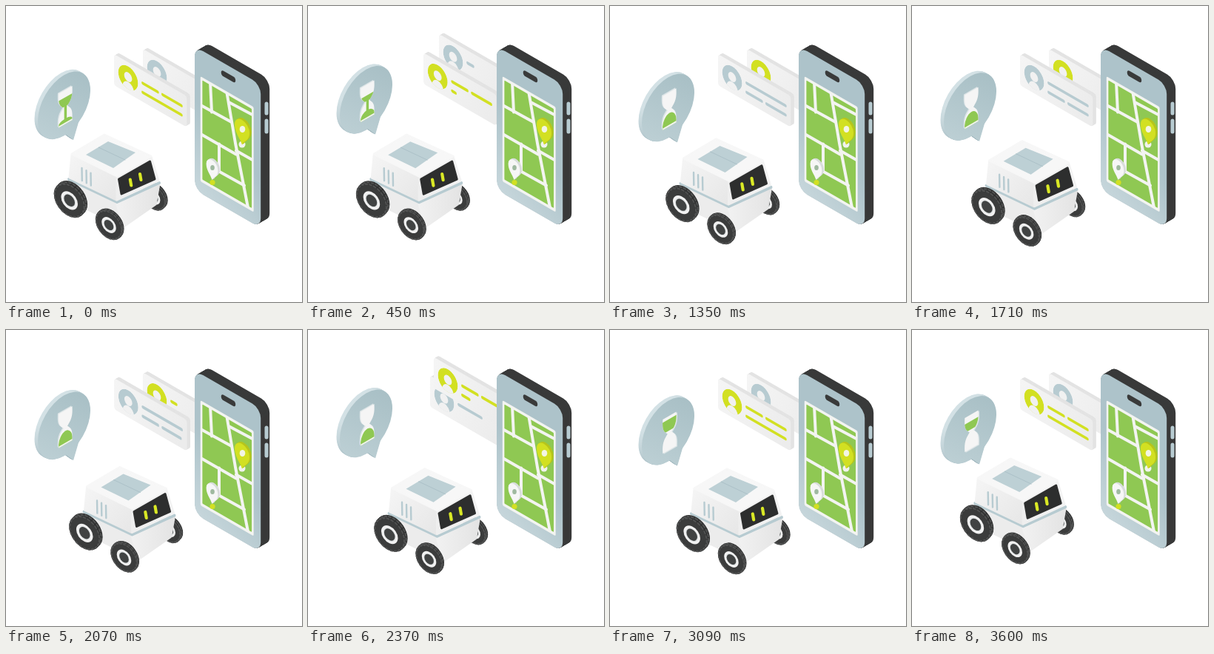
An HTML page with a canvas that plays this animation: 400x400 px, repeating every 3.63 s.

```html
<!DOCTYPE html>
<html lang="en">
<head>
<meta charset="utf-8">
<title>Delivery robot</title>
<style>
  html, body { margin: 0; width: 100%; height: 100%; overflow: hidden; background: #fff; }
  canvas { display: block; width: 400px; height: 400px; }
</style>
</head>
<body>
<canvas id="stage"></canvas>
<script>
const LOOP = 3630, HALF = LOOP / 2;
const LIME = '#d2e022', GREEN = '#8fc853', STEEL = '#b7cbd1', WHITE = '#f5f5f5', DARK = '#393a3a';

const canvas = document.getElementById('stage');
const dpr = window.devicePixelRatio || 1;
canvas.width = canvas.height = 400 * dpr;
const c = canvas.getContext('2d');

// Isometric planes: LEFT faces lower left, RIGHT faces lower right.
const LEFT = [.866, .5, 0, 1], RIGHT = [.866, -.5, 0, 1], FLAT = [1, 0, 0, 1];
const WHEEL = [.95, .4, 0, .98];

const clamp = x => Math.min(1, Math.max(0, x));
const span = (t, a, b) => clamp((t - a) / (b - a));
const ease = x => x * x * (3 - 2 * x);

// Smooth curve through [time, value] keys, at rest at both ends.
function track(keys, t) {
  const last = keys.length - 1;
  if (t <= keys[0][0]) return keys[0][1];
  if (t >= keys[last][0]) return keys[last][1];
  const i = keys.findIndex(k => k[0] > t) - 1;
  const slope = j => j <= 0 || j >= last ? 0 :
    (keys[j + 1][1] - keys[j - 1][1]) / (keys[j + 1][0] - keys[j - 1][0]);
  const [t0, a] = keys[i], [t1, b] = keys[i + 1], d = t1 - t0, s = (t - t0) / d;
  const s2 = s * s, s3 = s2 * s;
  return a * (2 * s3 - 3 * s2 + 1) + b * (3 * s2 - 2 * s3)
    + d * (slope(i) * (s3 - 2 * s2 + s) + slope(i + 1) * (s3 - s2));
}

function on(plane, x, y, draw) {
  c.save();
  c.transform(...plane, x, y);
  draw();
  c.restore();
}

function fade(x0, y0, x1, y1, from, to) {
  const g = c.createLinearGradient(x0, y0, x1, y1);
  g.addColorStop(0, from);
  g.addColorStop(1, to);
  return g;
}

function poly(color, ...p) {
  c.beginPath();
  for (let i = 0; i < p.length; i += 2) c.lineTo(p[i], p[i + 1]);
  c.closePath();
  c.fillStyle = color;
  c.fill();
}

// Polygon with softly rounded corners.
function soft(color, ...p) {
  poly(color, ...p);
  c.strokeStyle = color;
  c.lineWidth = 3;
  c.lineJoin = 'round';
  c.stroke();
}

function line(color, width, ...p) {
  c.beginPath();
  for (let i = 0; i < p.length; i += 2) c.lineTo(p[i], p[i + 1]);
  c.strokeStyle = color;
  c.lineWidth = width;
  c.lineCap = c.lineJoin = 'round';
  c.stroke();
}

function disc(color, x, y, rx, ry = rx) {
  c.beginPath();
  c.ellipse(x, y, rx, ry, 0, 0, 7);
  c.fillStyle = color;
  c.fill();
}

function box(color, x, y, w, h, r) {
  c.beginPath();
  c.roundRect(x, y, w, h, r);
  c.fillStyle = color;
  c.fill();
}

// Stack copies of a shape from the back (dx, dy) to the front.
function extrude(plane, x, y, dx, dy, side, shape) {
  const n = Math.ceil(Math.abs(dx) * 2);
  for (let i = n; i > 0; i--) on(plane, x + dx * i / n, y + dy * i / n, () => shape(side));
}

function bubble(t) {
  const y = 132.2 - 5.8 * Math.cos(2 * Math.PI * (t / HALF - .31)), x = 78.5;
  const shape = color => {
    poly(color, 2, 40, 14.5, 54, 23, 33);
    disc(color, 0, 0, 41);
  };
  extrude(RIGHT, x, y, -4.5, -2.6, fade(-30, -20, 0, 50, '#d3e1e5', '#94adb5'), shape);
  on(RIGHT, x, y, () => {
    shape(fade(25, -30, -30, 30, '#a9c0c6', '#bccfd4'));
    c.translate(2.2, 3);
    hourglass(t);
  });
}

function hourglass(t) {
  const turned = t >= 2700;
  const fall = span(turned ? t : t + LOOP, 3050, 4800);
  c.rotate(Math.PI * ease(span(t, 2700, 3050)));
  const glass = () => {
    c.beginPath();
    c.moveTo(-10.5, -23);
    c.lineTo(10.5, -23);
    c.bezierCurveTo(11.5, -9, 9, -6, 3, 0);
    c.bezierCurveTo(9, 6, 11.5, 9, 10.5, 23);
    c.lineTo(-10.5, 23);
    c.bezierCurveTo(-11.5, 9, -9, 6, -3, 0);
    c.bezierCurveTo(-9, -6, -11.5, -9, -10.5, -23);
    c.closePath();
  };
  c.save();
  c.translate(-1.6, -1.6);
  glass();
  c.fillStyle = '#dde5e7';
  c.fill();
  c.restore();
  glass();
  c.fillStyle = WHITE;
  c.fill();
  c.save();
  c.clip();
  c.fillStyle = GREEN;
  if (turned) {
    // The full chamber is carried over to the top by the turn.
    c.fillRect(-12, 3, 24, 16 - 15 * fall);
  } else {
    const top = -19 + 18 * fall;
    c.fillRect(-12, top, 24, -1 - top);
    if (fall < 1) c.fillRect(-2, -2, 4, 20);
    if (fall > 0) disc(GREEN, 0, 21, 11, 16 * fall);
    c.fillStyle = WHITE;
    c.fillRect(-12, 21, 24, 4);
  }
  c.restore();
}

const LONG = [[45, 105]], SPLIT = [[45, 68], [76, 105]];

function card(x, y, color, rows, p) {
  const shape = fill => box(fill, 0, 0, 113.5, 42, 4);
  extrude(LEFT, x, y, 4.5, -2.6, '#e3e3e3', shape);
  on(LEFT, x, y, () => {
    shape(fade(0, 0, 100, 41, '#f5f5f5', '#ececec'));
    c.save();
    c.beginPath();
    c.arc(22, 21, 15.5, 0, 7);
    c.clip();
    disc(color, 22, 21, 15.5);
    disc('#f1f1f1', 22, 20, 6.2);
    disc('#f1f1f1', 22, 36.5, 9, 10);
    c.restore();
    // The rows are written one after the other.
    rows.forEach((row, i) => {
      const reach = 43 + 62 * clamp(2 * p - i), v = 17 + 12.5 * i;
      for (const [a, b] of row) {
        if (reach > a) line(color, 4.2, a, v, Math.min(b, reach), v);
      }
    });
  });
}

const RISE_X = [[225, 185], [345, 183], [540, 171], [855, 149], [885, 146]];
const RISE_Y = [[225, 58], [255, 57.4], [345, 53.5], [490, 33], [540, 35.5], [855, 55], [870, 59.5], [885, 65]];

function cards(t) {
  const phase = t % HALF, first = t < HALF;
  const k = ease(span(phase, 225, 900));
  const lime = [LIME, [SPLIT, LONG], first ? 1 - span(t, 250, 700) : span(t, 2030, 2600)];
  const grey = [STEEL, [LONG, SPLIT], first ? span(t, 400, 1030) : 1 - span(t, 2065, 2500)];
  const [up, down] = first ? [grey, lime] : [lime, grey];
  const order = [
    () => card(track(RISE_X, phase), track(RISE_Y, phase), ...up),
    () => card(146 + 39 * k, 65 - 7 * k, ...down)
  ];
  if (phase > 510) order.reverse();
  order.forEach(draw => draw());
}

function pin(x, y, color, edge, s) {
  const shape = fill => {
    c.beginPath();
    c.moveTo(0, 21 * s);
    c.bezierCurveTo(-3 * s, 14 * s, -11 * s, 11 * s, -11 * s, 0);
    c.arc(0, 0, 11 * s, Math.PI, 0);
    c.bezierCurveTo(11 * s, 11 * s, 3 * s, 14 * s, 0, 21 * s);
    c.fillStyle = fill;
    c.fill();
  };
  extrude(LEFT, x, y, 2.6, -1.5, edge, shape);
  on(LEFT, x, y, () => shape(color));
}

function phone() {
  const top = 54.5;
  const shape = color => box(color, 0, 0, 103, 194, 13);
  extrude(LEFT, 255, top, 12, -7, DARK, shape);
  line(STEEL, 5, 352, 132, 352, 145);
  line(STEEL, 5, 352, 155, 352, 170);
  on(LEFT, 255, top, () => {
    shape(fade(0, 190, 50, 100, '#c6d6db', '#adc3ca'));
    line(DARK, 7.5, 45, 14.5, 60, 14.5);
    box('#f3f4f1', 9, 36, 83, 142, 2);
    box(GREEN, 12, 40, 77, 134, 1);
    c.beginPath();
    c.rect(10, 37, 81, 140);
    c.clip();
    c.transform(1 / .866, -.5 / .866, 0, 1, 0, 0);
    c.translate(-255, -52);
    const road = (...p) => line('#f3f4f1', 4, ...p);
    road(298, 112, 310, 183, 328, 275);
    road(276, 100, 278, 141);
    road(264, 132, 304, 154);
    road(264, 171, 311, 198);
    road(302, 128, 334, 145);
    road(311, 193, 334, 206);
    road(288, 184, 288, 220);
    road(286, 220, 322, 240);
  });
  disc('#f1f3ef', 319, 187, 4.5);
  pin(319, 165.5, LIME, '#b7c51d', 1.05);
  disc('#f3f5e4', 319.5, 166.5, 3.8, 4.6);
  disc(LIME, 279, 238.5, 3.6);
  pin(278.5, 217.5, '#f6f6f6', '#d9dddc', .83);
  disc('#9fb9a0', 279, 218.5, 2.8, 3.5);
}

function wheel(x, y, r, turn, deep) {
  const tyre = color => disc(color, 0, 0, r);
  extrude(WHEEL, x, y, deep, -deep, '#303131', tyre);
  const tread = (dx, dy) => on(WHEEL, x + dx, y + dy, () => {
    c.rotate(turn);
    c.beginPath();
    c.arc(0, 0, r - 1, 0, 7);
    c.setLineDash([r * .12, r * .15]);
    c.lineWidth = 2.4;
    c.strokeStyle = '#505151';
    c.stroke();
  });
  tread(deep * .7, -deep * .7);
  on(WHEEL, x, y, () => tyre('#353636'));
  tread(0, 0);
  on(WHEEL, x, y, () => {
    disc('#3b3c3c', 0, 0, r - 2.5);
    disc('#f1f1f1', 0, 0, r * .54);
    disc('#d5dadb', 0, 0, r * .39);
    disc('#414343', 0, 0, r * .35);
  });
}

const DRIVE = [[0, 0], [540, .5], [870, 3.3], [1350, 10.5], [2070, 20.5], [2700, 28.6],
  [2820, 29], [3090, 25], [3250, 18.5], [3630, 0]];

function robot(t) {
  const d = track(DRIVE, t), turn = d / 22;
  on(FLAT, d, d * .56, () => {
    wheel(200, 259, 16.5, turn, 3);
    // chassis
    soft('#ececec', 85, 236, 149, 268, 158, 298, 98, 269);
    soft(fade(150, 270, 205, 270, '#f1f1f1', '#e4e4e4'), 150, 268, 207, 240, 202, 268, 159, 298);
    line(STEEL, 4, 85, 234, 150, 265, 207, 239);
    // cabin
    soft(fade(90, 205, 150, 260, '#f4f4f4', '#e7e7e7'), 89, 201, 150, 232, 149, 262, 86, 232);
    soft(fade(150, 240, 210, 230, '#eeeeee', '#f4f4f4'), 150, 232, 196, 204, 206, 236, 150, 262);
    soft('#f7f7f7', 89, 200, 133, 174, 196, 203, 150, 230);
    poly('#bdd0d5', 108, 201, 138, 183, 175, 198, 145, 219);
    line('#a7bdc4', .8, 125, 191, 161, 208);
    for (const x of [102.5, 108.5, 114.5]) {
      const y = 219 + (x - 102.5) * .55;
      line(STEEL, 2.4, x, y, x + .3, y + 17);
    }
    soft('#2d2e2e', 152.5, 234, 194.5, 210, 201, 234, 156, 254);
    line('#d9e825', 4.2, 167.8, 234.5, 169.2, 242.5);
    line('#d9e825', 4.2, 181, 227, 182.4, 235);
    wheel(85.7, 262.8, 22, turn, 3.5);
    wheel(139, 296, 19, turn, 2.5);
  });
}

function render(now) {
  const t = now % LOOP;
  c.setTransform(dpr, 0, 0, dpr, 0, 0);
  c.fillStyle = '#fff';
  c.fillRect(0, 0, 400, 400);
  bubble(t);
  cards(t);
  phone();
  robot(t);
}

const start = performance.now();
function tick() {
  render(performance.now() - start);
  requestAnimationFrame(tick);
}
tick();
</script>
</body>
</html>
```
